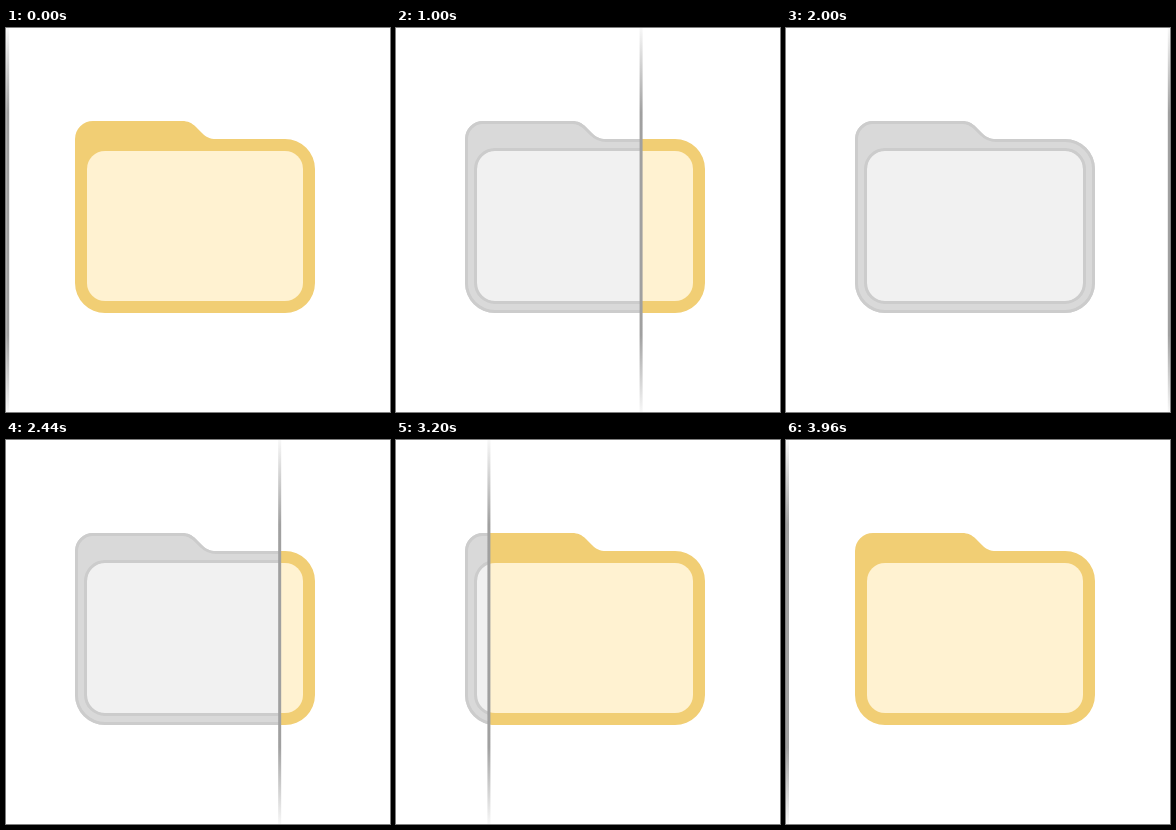
An HTML page with a canvas that plays this animation: 384x384 px, repeating every 4000 ms.

```html
<!DOCTYPE html>
<html lang="en">
<head>
<meta charset="utf-8">
<title>Folder wipe</title>
<style>
  html, body { margin: 0; width: 100%; height: 100%; overflow: hidden; background: #fff; }
  canvas { display: block; width: 100%; height: 100%; }
</style>
</head>
<body>
<canvas id="stage" width="384" height="384"></canvas>
<script>
const SIZE = 384;
const LOOP = 4000;
const TURN = 2000;
const REST = 3960;
const LEFT = 1.5;
const RIGHT = 383.5;
const BAR = 3;

const ctx = document.getElementById('stage').getContext('2d');

const outline = new Path2D(
  'M69 111 A18 18 0 0 1 87 93 H176 C182 93 186 95 190 99 L196 105' +
  ' C200 109 204 111 210 111 H279 A30 30 0 0 1 309 141 V255' +
  ' A30 30 0 0 1 279 285 H99 A30 30 0 0 1 69 255 Z');

function roundBox(x, y, w, h, r) {
  const path = new Path2D();
  path.roundRect(x, y, w, h, r);
  return path;
}

const panel = roundBox(81, 123, 216, 150, 18);
const panelEdge = roundBox(79.5, 121.5, 219, 153, 19.5);

const barFill = ctx.createLinearGradient(0, 0, 0, SIZE);
[[0, 0.08], [0.22, 1], [0.8, 1], [1, 0.08]].forEach(([stop, alpha]) =>
  barFill.addColorStop(stop, `rgba(160,160,160,${alpha})`));

function bezier(a, b, c, s) {
  const u = 1 - s;
  return 3 * u * u * s * a + 3 * u * s * s * b + c * s * s * s;
}

// Steady start, soft stop: cubic-bezier(1/6, 1/6, 2/3, 1)
function ease(p) {
  if (p <= 0) return 0;
  if (p >= 1) return 1;
  let lo = 0, hi = 1;
  for (let i = 0; i < 30; i++) {
    const mid = (lo + hi) / 2;
    if (bezier(1 / 6, 2 / 3, 1, mid) < p) lo = mid;
    else hi = mid;
  }
  return bezier(1 / 6, 1, 1, lo);
}

function barAt(t) {
  const span = RIGHT - LEFT;
  return t < TURN
    ? LEFT + span * ease(t / TURN)
    : RIGHT - span * ease((t - TURN) / (REST - TURN));
}

function fill(path, color) {
  ctx.fillStyle = color;
  ctx.fill(path);
}

function stroke(path, color, width) {
  ctx.strokeStyle = color;
  ctx.lineWidth = width;
  ctx.stroke(path);
}

function within(x, w, paint) {
  ctx.save();
  ctx.beginPath();
  ctx.rect(x, 0, w, SIZE);
  ctx.clip();
  paint();
  ctx.restore();
}

function grayFolder() {
  fill(outline, '#d9d9d9');
  ctx.save();
  ctx.clip(outline);
  stroke(outline, '#cccccc', 6);
  ctx.restore();
  fill(panel, '#f1f1f1');
  stroke(panelEdge, '#cccccc', 3);
}

function yellowFolder() {
  fill(outline, '#f1ce74');
  fill(panel, '#fff2d1');
}

function draw(t) {
  const x = barAt(t);
  ctx.fillStyle = '#fff';
  ctx.fillRect(0, 0, SIZE, SIZE);
  within(0, x, grayFolder);
  within(x, SIZE - x, yellowFolder);
  ctx.fillStyle = barFill;
  ctx.fillRect(x - BAR / 2, 0, BAR, SIZE);
}

const start = performance.now();
function tick() {
  draw((performance.now() - start) % LOOP);
  requestAnimationFrame(tick);
}
tick();
</script>
</body>
</html>
```
